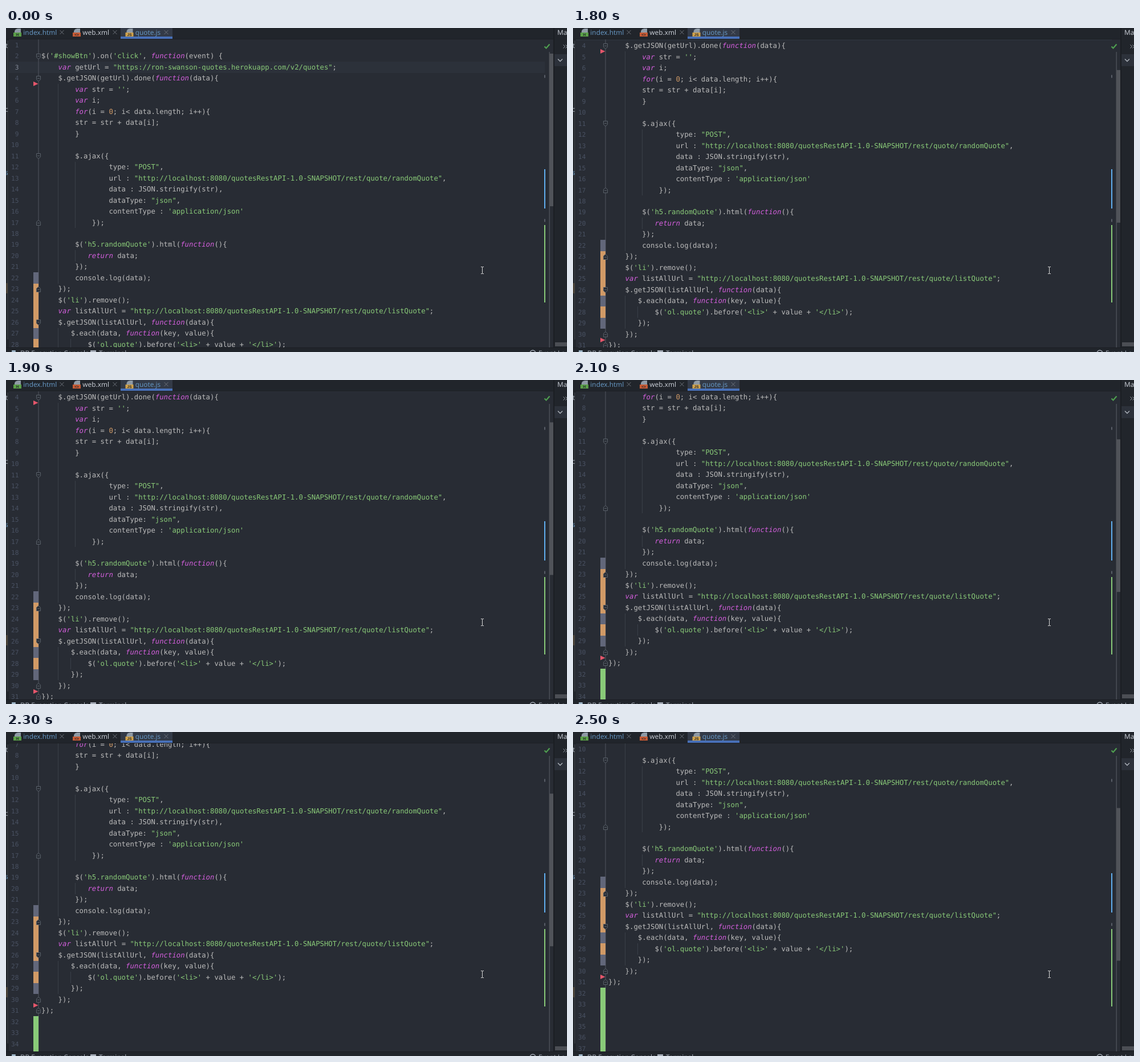
An HTML page for the animation above (2.7 s loop, 984 px wide and 569 px high).

```html
<!DOCTYPE html>
<html lang="en">
<head>
<meta charset="utf-8">
<title>Editor scroll</title>
<style>
  @property --s { syntax: '<number>'; inherits: true; initial-value: 0; }

  html, body { margin: 0; width: 100%; height: 100%; overflow: hidden; background: #21252b; }
  svg { display: block; width: 984px; height: 569px; animation: scroll 2700ms step-end infinite; }

  /* three wheel ticks of three lines each */
  @keyframes scroll {
    0%     { --s: 0; }
    62.96% { --s: 1; }
    66.66% { --s: 57; }
    70.37% { --s: 58; }
    74.07% { --s: 96; }
    77.77% { --s: 117; }
    85.18% { --s: 125; }
    88.88% { --s: 174; }
    92.59% { --s: 175; }
    100%   { --s: 175; }
  }
  #page  { transform: translateY(calc(var(--s) * -1px)); }
  #thumb { transform: translateY(calc(var(--s) * .506px)); }

  text { white-space: pre; text-rendering: geometricPrecision; }
  #page text { font: 12.3px "DejaVu Sans Mono", "Noto Sans Mono", monospace; fill: #bbbbbb; }
  #page .str { fill: #89ca78; }
  #page .key { fill: #d55fde; font-style: italic; }
  #page .num { fill: #d19a66; }
  #page .no  { font-size: 11.2px; fill: #495162; text-anchor: end; }
  #page .now { fill: #838a97; }
  .ui text { font: 11.8px "Noto Sans", "Open Sans", sans-serif; fill: #a4abb6; }
  .ui .blue { fill: #6494bf; }
  .ui .lit { fill: #c3c8d0; }
  .ui .badge { font: bold 6.5px "Liberation Sans", Arial, sans-serif; text-anchor: middle; fill: #23272d; }
  .guide { stroke: #3a3f48; }
  .fold { fill: #282c34; stroke: #596069; }
  .line { fill: none; }
</style>
</head>
<body>
<svg viewBox="0 0 984 569">
  <defs>
    <clipPath id="view"><rect x="5" y="20" width="948" height="541"/></clipPath>
  </defs>
  <rect width="984" height="569" fill="#21252b"/>
  <rect x="5" y="20" width="956" height="541" fill="#282c34"/>

  <g clip-path="url(#view)"><g id="page"></g></g>

  <!-- error stripe and scrollbar -->
  <path class="line" d="M944.5 32.5l3 3 6-7" stroke="#4f9f50" stroke-width="2.2"/>
  <path class="line" d="M945 82.5v5M945 335.5v5" stroke="#666b75" stroke-width="1.6"/>
  <rect x="944" y="248" width="2" height="69" fill="#61afef"/>
  <rect x="944" y="346" width="2" height="136" fill="#89ca78"/>
  <rect x="952.5" y="42" width="1.5" height="519" fill="#4a4e55"/>
  <rect id="thumb" x="953" y="45" width="7" height="268" fill="#505359"/>
  <rect x="960" y="0" width="2" height="561" fill="#1b1e23"/>

  <!-- left edge -->
  <rect x="2.5" y="22" width="1.5" height="525" fill="#3a3e45"/>
  <rect y="448" width="3" height="18" fill="#494136"/>

  <g class="ui">
    <rect x="201" width="91" height="19" fill="#333a47"/>
    <rect x="201" y="15" width="91" height="4" fill="#4870b8"/>
    <rect y="19" width="961" height="1" fill="#1d2025"/>
    <g id="tabs"></g>

    <text x="-1" y="35">t</text>
    <text x="-2" y="147">c</text>
    <text x="-2" y="258" class="blue">s</text>

    <text x="967" y="12" class="lit">Maven</text>
    <path class="line" d="M977.5 29.5l3 3-3 3M981.5 29.5l3 3-3 3" stroke="#9aa0aa"/>
    <rect x="962" y="46" width="22" height="21" fill="#2c313a"/>
    <path class="line" d="M968 54.5l4 4 4-4" stroke="#b4b9c1" stroke-width="1.3"/>
    <rect x="963" y="552" width="21" height="7" fill="#4b4e54"/>

    <rect y="561" width="984" height="8" fill="#21252b"/>
    <rect y="561" width="984" height="1" fill="#1b1e23"/>
    <rect x="10" y="566" width="7" height="3" rx="1" fill="#9db4c6"/>
    <text x="25" y="574.5">DB Execution Console</text>
    <rect x="148" y="566" width="10" height="8" fill="#a4abb6"/>
    <text x="163" y="574.5">Terminal</text>
    <circle class="line" cx="924" cy="571" r="5" stroke="#a4abb6" stroke-width="1.3"/>
    <text x="934" y="574.5">Event Log</text>
  </g>

  <!-- mouse pointer -->
  <path class="line" d="M833 419.5h2l.5 .5 .5-.5h2M835.5 420v11M833 431.5h2l.5-.5 .5 .5h2" stroke="#d8d8d8"/>
</svg>

<script>
  const code = `
$('#showBtn').on('click', function(event) {
    var getUrl = "https://ron-swanson-quotes.herokuapp.com/v2/quotes";
    $.getJSON(getUrl).done(function(data){
        var str = '';
        var i;
        for(i = 0; i< data.length; i++){
        str = str + data[i];
        }

        $.ajax({
                type: "POST",
                url : "http://localhost:8080/quotesRestAPI-1.0-SNAPSHOT/rest/quote/randomQuote",
                data : JSON.stringify(str),
                dataType: "json",
                contentType : 'application/json'
            });

        $('h5.randomQuote').html(function(){
           return data;
        });
        console.log(data);
    });
    $('li').remove();
    var listAllUrl = "http://localhost:8080/quotesRestAPI-1.0-SNAPSHOT/rest/quote/listQuote";
    $.getJSON(listAllUrl, function(data){
       $.each(data, function(key, value){
           $('ol.quote').before('<li>' + value + '</li>');
       });
    });
});
`.split('\n');

  const LEFT = 62, CHAR = 7.4, ROW = 19.47, LAST = 38;
  const page = document.getElementById('page');
  const tabs = document.getElementById('tabs');
  const rowMid = n => 30.2 + (n - 1) * ROW;
  const rowTop = n => Math.round(rowMid(n) - ROW / 2);
  const colX = c => LEFT + c * CHAR;

  function add(group, tag, attrs, text) {
    const el = document.createElementNS('http://www.w3.org/2000/svg', tag);
    for (const k in attrs) el.setAttribute(k, attrs[k]);
    if (text) el.textContent = text;
    group.append(el);
  }
  const box = (x, y, width, height, fill) => add(page, 'rect', { x, y, width, height, fill });

  // caret row and gutter edge
  box(5, rowTop(3), 940, rowTop(4) - rowTop(3), '#2c313a');
  box(56.5, 0, 1, 760, '#50555e');

  // indent guides: column, first line, last line
  for (const [c, a, b] of [[4, 5, 22], [8, 12, 17], [8, 20, 20], [4, 27, 29], [7, 28, 28]]) {
    const x = Math.floor(colX(c)) + .5;
    add(page, 'path', { class: 'guide', d: `M${x} ${rowTop(a)}V${rowTop(b + 1)}` });
  }

  // change markers: first line, last line, colour
  const GREY = '#62677a', ORANGE = '#d19a66', GREEN = '#89ca78';
  for (const [a, b, fill] of [[22, 22, GREY], [23, 26, ORANGE], [27, 27, GREY],
                              [28, 28, ORANGE], [29, 29, GREY], [32, LAST, GREEN]])
    box(48, rowTop(a), 9, rowTop(b + 1) - rowTop(a), fill);

  for (const n of [5, 31])
    add(page, 'path', { d: `M48 ${rowTop(n) - 4}l8.5 4-8.5 4z`, fill: '#e4566b' });

  // fold handles: 1 points down, -1 points up
  const handle = (n, dir) => add(page, 'path', {
    class: 'fold',
    transform: `translate(57 ${Math.round(rowMid(n))}) scale(1 ${dir})`,
    d: 'M-3.5-4.5h7v6l-3.5 3-3.5-3zM-2-.5h4'
  });
  [2, 4, 11, 26].forEach(n => handle(n, 1));
  [17, 23, 30, 31].forEach(n => handle(n, -1));

  // line numbers and highlighted code
  const token = /(["'].*?["'])|\b(function|var|for|return)\b|\b(\d+)\b|(?:(?!["']|\b(?:function|var|for|return)\b|\b\d).)+/g;
  for (let n = 1; n <= LAST; n++) {
    const y = Math.round(rowMid(n) + 3.8);
    add(page, 'text', { x: 22.5, y, class: n === 3 ? 'no now' : 'no' }, String(n));
    const line = code[n - 1] || '';
    const indent = line.search(/\S|$/);
    for (const m of line.slice(indent).matchAll(token)) {
      const cls = m[1] ? 'str' : m[2] ? 'key' : m[3] ? 'num' : '';
      add(page, 'text', { x: colX(indent + m.index).toFixed(2), y, class: cls }, m[0]);
    }
  }

  // tabs: icon x, name, name style, close x, badge text, badge colour
  for (const [x, name, cls, end, mark, fill] of [
    [13, 'index.html', 'blue', 98, 'H', '#5a9e48'],
    [117, 'web.xml', 'lit', 191, '<>', '#c75b35'],
    [209.5, 'quote.js', 'blue', 281, 'JS', '#d0a24c']]) {
    add(tabs, 'path', { d: `M${x + 7} 1h6v7h-11v-2.5zM${x + 2} 4.5l3.5-3.5v3.5z`, fill: '#8f9aa5' });
    add(tabs, 'rect', { x, y: 8, width: 14, height: 7, fill });
    add(tabs, 'text', { x: x + 7, y: 14, class: 'badge' }, mark);
    add(tabs, 'text', { x: x + 17.3, y: 12, class: cls }, name);
    add(tabs, 'path', { class: 'line', d: `M${end - 3.5} 4l7 7m0-7l-7 7`, stroke: '#6d727b' });
  }
</script>
</body>
</html>
```
